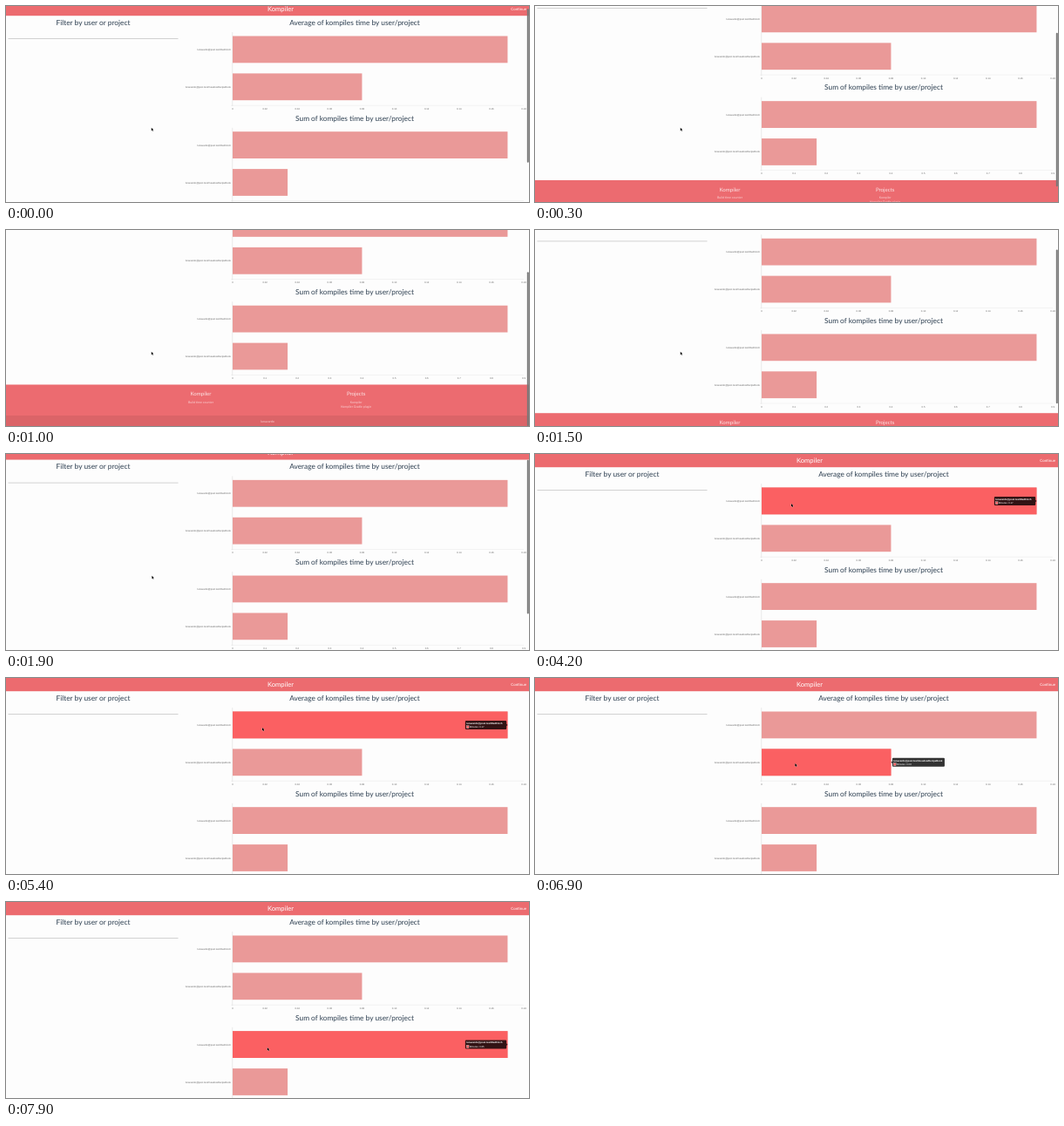
Write an HTML page that moves like this. It is 600 px wide and 225 px high and loops after 8000 ms.

```html
<!DOCTYPE html>
<html lang="en">
<head>
<meta charset="utf-8">
<title>Kompiler</title>
<style>
  html, body { margin: 0; width: 100%; height: 100%; overflow: hidden; background: #fdfdfd; }
  svg { display: block; width: 100vw; height: 100vh; }
  text { font-family: Lato, sans-serif; text-rendering: geometricPrecision; }
  .tiny { font-family: "Liberation Sans", Arial, sans-serif; font-size: 2.8px; }
</style>
</head>
<body>
<svg id="stage" viewBox="0 0 600 225"></svg>
<script>
const LOOP = 8000, STEP = 100, VIEW = 225, PAGE = 286.5, LEFT = 260, PLOT = 334;
const USER = 'lunavardo@post.test';
const stage = document.getElementById('stage');

function add(parent, tag, attrs, text) {
  const el = document.createElementNS('http://www.w3.org/2000/svg', tag);
  for (const key in attrs) el.setAttribute(key, attrs[key]);
  if (text !== undefined) el.textContent = text;
  parent.append(el);
  return el;
}
const group = parent => add(parent, 'g', {});
const rect = (parent, x, y, width, height, fill, more) =>
  add(parent, 'rect', { x, y, width, height, fill, ...more });
const label = (parent, x, y, text, size, fill, anchor = 'middle') =>
  add(parent, 'text', { x, y, 'font-size': size, fill, 'text-anchor': anchor }, text);
const tiny = (parent, x, y, text, fill, anchor, weight = 400) =>
  add(parent, 'text', { x, y, fill, class: 'tiny', 'text-anchor': anchor, 'font-weight': weight }, text);

const page = group(stage);
const tips = group(page);
const bars = [];

function addBar(y, value, max, project, inAt, outAt) {
  const width = value / max * PLOT, end = LEFT + width, mid = y + 15.4;
  const name = USER + '/' + project;
  rect(page, LEFT, y, width, 30.8, '#ea9998');
  const glow = rect(page, LEFT, y, width, 30.8, '#fb6062');
  tiny(page, 258, mid + 1, name, '#666', 'end');
  if (inAt === undefined) return glow.remove();

  const tip = group(tips), onRight = end < 500;
  const boxWidth = onRight ? 60 : 47.3;
  const x = onRight ? end + 1.5 : end - 1.3 - boxWidth;
  const edge = onRight ? x : x + boxWidth;
  rect(tip, x, mid - 5, boxWidth, 10, '#000', { rx: 1, 'fill-opacity': .8 });
  add(tip, 'path', { d: `M${edge} ${mid - 1.3}L${end} ${mid}L${edge} ${mid + 1.3}z`, 'fill-opacity': .8 });
  tiny(tip, x + 1.4, mid - 1.2, name, '#fff', 'start', 700);
  rect(tip, x + 1.4, mid + .9, 2.8, 2.8, '#fb6062', { stroke: '#fff', 'stroke-width': .3 });
  tiny(tip, x + 5, mid + 3.3, 'Minutes: ' + value, '#fff', 'start');
  bars.push({ glow, tip, inAt, outAt });
}

function addChart(top, title, max, step, digits) {
  label(page, 400, top + 2.8, title, 8.35, '#2c3e50');
  rect(page, 258, top + 94.9, PLOT + 2, .4, '#e2e2e2');
  rect(page, LEFT - .3, top + 11, .4, 85, '#d0d0d0');
  for (let i = 0; i <= 9; i++)
    tiny(page, LEFT + PLOT * i / 9, top + 99.8, i ? (i * step).toFixed(digits) : '0', '#666', 'middle');
}

// Header and filter
rect(page, 0, 0, 600, 15.2, '#ec6b6f');
label(page, 315, 10.1, 'Kompiler', 7.6, '#fff');
label(page, 597, 9, 'Continue', 4.4, '#fff', 'end');
label(page, 100, 25.8, 'Filter by user or project', 8.35, '#2c3e50');
rect(page, 2.5, 41.4, 195, .6, '#b4b4b4');

// Charts
addChart(23, 'Average of kompiles time by user/project', .18, .02, 2);
addBar(38.5, .17, .18, 'RedFinch', 3300, 6000);
addBar(81.4, .08, .18, 'meadowRecipeBook', 6100, 7100);
addChart(132.7, 'Sum of kompiles time by user/project', .9, .1, 1);
addBar(148.2, .85, .9, 'RedFinch', 7300, LOOP);
addBar(191.1, .17, .9, 'meadowRecipeBook');

// Footer
rect(page, 0, 239, 600, 36, '#ec6b70');
rect(page, 0, 274.5, 600, 12.5, '#db6468');
label(page, 223.5, 251.6, 'Kompiler', 6.1, '#fbe3e4');
label(page, 223.5, 260.1, 'Build time counter', 3.6, '#f9d3d4');
label(page, 401.7, 251.6, 'Projects', 6.1, '#fbe3e4');
label(page, 401.7, 260.1, 'Kompiler', 3.5, '#f9d3d4');
label(page, 401.7, 265, 'Kompiler Gradle plugin', 3.5, '#f9d3d4');
label(page, 300, 282, 'lunavardo', 3.6, '#f9d3d4');
page.append(tips);

const thumb = rect(stage, 597.8, 0, 2, VIEW * VIEW / PAGE, '#777', { rx: 1 });
const cursor = add(stage, 'path', {
  d: 'M0 0V3.4L.8 2.7L1.4 4L2 3.7L1.4 2.5H2.5z', fill: '#000',
  stroke: '#fff', 'stroke-width': .35, 'paint-order': 'stroke'
});

const clamp = u => Math.min(1, Math.max(0, u));
const easeOut = u => 1 - (1 - clamp(u)) ** 2;
const fade = (t, start) => 1 - (1 - clamp((t - start) / 400)) ** 4;

// Each key is [time, value]; every move slows towards its end.
function track(keys, t) {
  let i = 0;
  while (i < keys.length - 2 && t >= keys[i + 1][0]) i++;
  const [t0, a] = keys[i], [t1, b] = keys[i + 1];
  return a + (b - a) * easeOut((t - t0) / (t1 - t0));
}

const scrollKeys = [[0, 4], [800, 61.5], [1200, 61.5], [2000, 7.8], [2200, 7.8], [2900, 0]];
const xKeys = [[1800, 166.8], [1900, 167.4], [2200, 167.4], [3200, 288], [3700, 294],
  [5700, 294], [6500, 298], [7000, 298.4], [7600, 299.8]];
const yKeys = [[2200, 139.8], [3200, 56.5], [3700, 57], [5700, 57], [6500, 97.5], [7000, 98], [7600, 167]];

function draw(now) {
  const t = Math.floor(now % LOOP / STEP) * STEP;
  const scroll = track(scrollKeys, t);
  page.setAttribute('transform', `translate(0 ${-scroll})`);
  thumb.setAttribute('y', scroll * VIEW / PAGE);
  thumb.setAttribute('opacity', 1 - clamp((t - 3200) / 500));
  cursor.setAttribute('transform', `translate(${track(xKeys, t)} ${track(yKeys, t)})`);
  for (const { glow, tip, inAt, outAt } of bars) {
    const level = fade(t, inAt) * (1 - fade(t, outAt));
    glow.setAttribute('opacity', level);
    tip.setAttribute('opacity', level);
  }
}

const start = performance.now();
function tick() {
  draw(performance.now() - start);
  requestAnimationFrame(tick);
}
tick();
</script>
</body>
</html>
```
